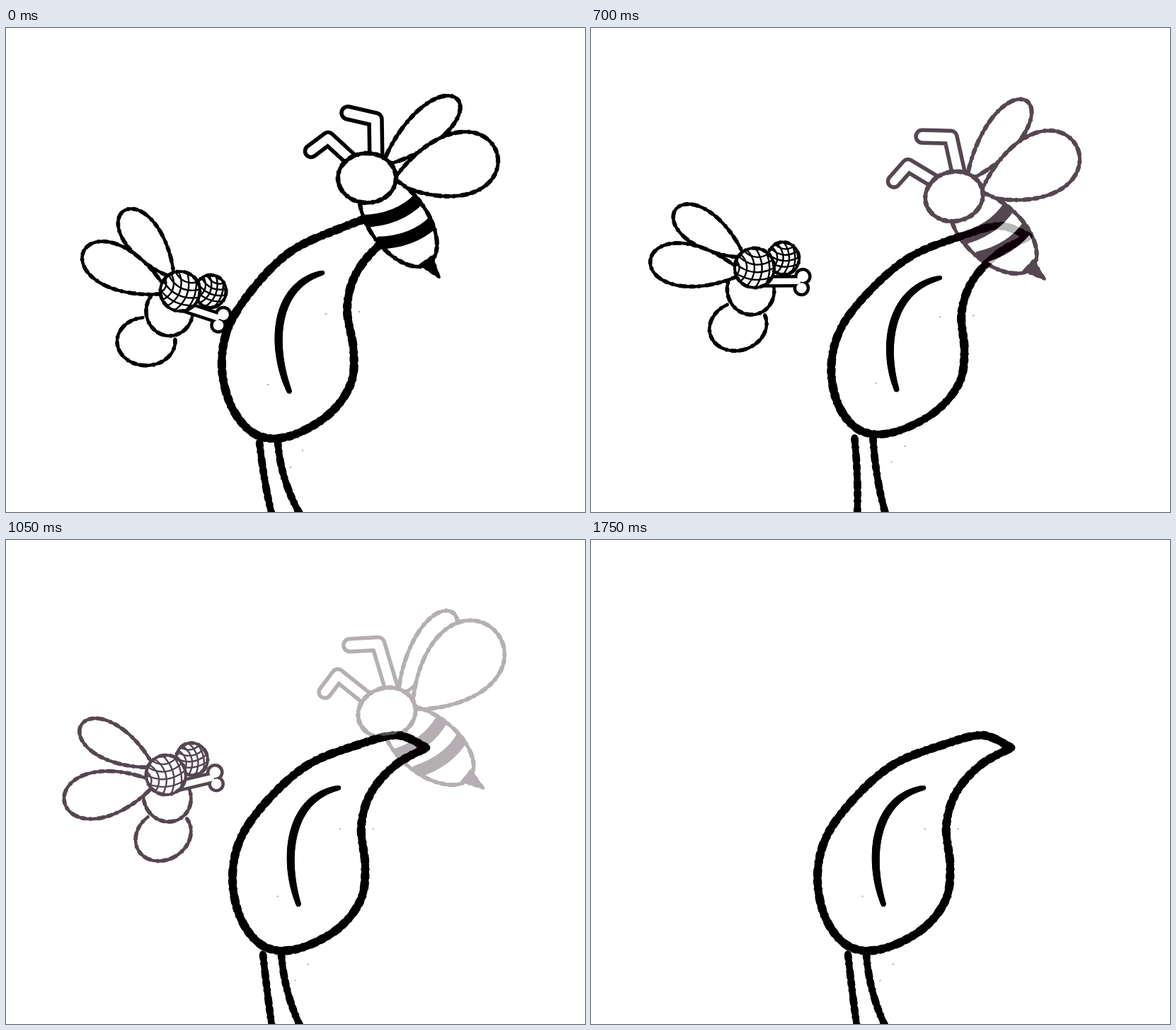
Animation of 818x684 px, one loop 2100 ms. Source, as an HTML page with a canvas:

```html
<!DOCTYPE html>
<html lang="en">
<head>
<meta charset="utf-8">
<title>Leaf, bee and fly</title>
<style>
html, body { margin: 0; width: 100%; height: 100%; overflow: hidden; background: #fff; }
canvas { display: block; }
</style>
</head>
<body>
<canvas id="stage" width="818" height="684"></canvas>
<script>
const W = 818, H = 684, STEP = 350, STEPS = 6;
const stage = document.getElementById('stage').getContext('2d');
const sheet = document.createElement('canvas');
sheet.width = W;
sheet.height = H;
const layer = sheet.getContext('2d');

// Smooth closed curve through points
function loopThrough(pts) {
  const path = new Path2D(), n = pts.length;
  const at = i => pts[(i + n) % n];
  path.moveTo(...pts[0]);
  for (let i = 0; i < n; i++) {
    // The first point is a sharp corner
    const a = i ? at(i - 1) : at(0), b = at(i), c = at(i + 1), d = i < n - 1 ? at(i + 2) : c;
    path.bezierCurveTo(b[0] + (c[0] - a[0]) / 6, b[1] + (c[1] - a[1]) / 6,
      c[0] - (d[0] - b[0]) / 6, c[1] - (d[1] - b[1]) / 6, c[0], c[1]);
  }
  path.closePath();
  return path;
}

function oval(x, y, rx, ry, from = 0, to = 2 * Math.PI) {
  const path = new Path2D();
  path.ellipse(x, y, rx, ry, 0, from, to);
  return path;
}

function line(...pts) {
  const path = new Path2D();
  pts.forEach(p => path.lineTo(...p));
  return path;
}

function bend(from, via, to) {
  const path = new Path2D();
  path.moveTo(...from);
  path.quadraticCurveTo(...via, ...to);
  return path;
}

// Teardrop that widens from its base towards a round end
function petal(x, y, angle, length, width) {
  const path = new Path2D(), cos = Math.cos(angle), sin = Math.sin(angle);
  for (let i = 0; i <= 60; i++) {
    const t = i / 60 * Math.PI, s = Math.sin(t);
    const u = length * s * s, v = width / 1.6 * Math.sin(2 * t) * s ** .8;
    path.lineTo(x + u * cos - v * sin, y + u * sin + v * cos);
  }
  return path;
}

// Pen line with a slightly uneven edge
function ink(c, path, width, fill) {
  if (fill) {
    c.fillStyle = fill;
    c.fill(path);
  }
  c.lineJoin = c.lineCap = 'round';
  c.lineWidth = width;
  c.stroke(path);
  c.lineCap = 'butt';
  c.lineWidth = width + 1.2;
  c.setLineDash([7, 5, 3, 8, 11, 4]);
  c.stroke(path);
  c.setLineDash([]);
}

// Outline around the union of thick round lines
function tubes(c, parts, pen) {
  const color = c.strokeStyle;
  c.lineCap = c.lineJoin = 'round';
  for (const side of [1, -1]) {
    c.strokeStyle = side > 0 ? color : '#fff';
    parts.forEach(([path, width]) => {
      c.lineWidth = width + side * pen;
      c.stroke(path);
    });
  }
  c.strokeStyle = color;
}

const BASE = { x: 376, y: 580 };
const leafPoses = [
  { x: 0, y: 0, lean: 0, tilt: 0, squash: 0 },
  { x: 9, y: 0, lean: .06, tilt: .06, squash: 0 },
  { x: 26, y: -6, lean: .085, tilt: .02, squash: .05 }
];
const leafEdge = loopThrough([[567, 282], [525, 267], [470, 284], [405, 314], [355, 361], [315, 421],
  [305, 480], [320, 538], [354, 575], [400, 577], [455, 547], [487, 503], [491, 455],
  [482, 398], [493, 350], [525, 309]]);
const specks = [[451, 403], [498, 400], [369, 503], [401, 620], [418, 596]];

function drawVein(c) {
  const mix = (t, a, b, d, e) =>
    (1 - t) ** 3 * a + 3 * t * (1 - t) ** 2 * b + 3 * t * t * (1 - t) * d + t ** 3 * e;
  c.fillStyle = '#000';
  for (let t = 0; t <= 1; t += .01) {
    const r = 3.2 + 2.6 * Math.sqrt(Math.sin(Math.PI * t));
    c.fill(oval(mix(t, 447, 375, 375, 401), mix(t, 346, 365, 455, 515), r, r));
  }
}

function drawLeaf(c, pose) {
  c.strokeStyle = '#000';
  const root = BASE.x + pose.x * .55, top = BASE.y + 5 + pose.y;
  ink(c, bend([root - 18, top], [root - 12, 640], [376, 690]), 9.5);
  ink(c, bend([root + 8, top], [root + 12, 640], [417, 690]), 9.5);
  c.save();
  c.translate(BASE.x + pose.x, BASE.y + pose.y);
  c.transform(1, pose.tilt, -pose.lean, 1 - pose.squash, 0, 0);
  c.translate(-BASE.x, -BASE.y);
  ink(c, leafEdge, 11, '#fff');
  drawVein(c);
  c.fillStyle = '#aaa';
  specks.forEach(([x, y]) => c.fillRect(x, y, 2, 2));
  c.restore();
}

// The origin is the middle of the head
function drawBee(c, { flap, solid }) {
  const pen = 5;
  ink(c, petal(22, -18, -.72, 141, 50), pen, '#fff');
  ink(c, petal(37, 5, -.26 - .22 * flap, 152 + 8 * flap, 88 + 12 * flap), pen, '#fff');

  c.save();
  c.rotate(.942);
  const body = oval(75, 0, 74, 41);
  ink(c, body, pen, solid && '#fff');
  c.save();
  c.clip(body);
  for (const u of [45, 83]) {
    c.lineWidth = 18;
    c.stroke(bend([u, 42], [u + 29, 0], [u + 22, -42]));
  }
  c.restore();
  ink(c, line([144, -9], [173, 0], [144, 11], [144, -9]), 3, c.strokeStyle);
  c.restore();

  const lift = 14 * flap, shift = 3 * flap;
  tubes(c, [[line([13 + shift, -15], [12 + shift, -83 - lift], [-27 + shift, -92 - lift]), 18]], 5.5);
  tubes(c, [[line([-18, -22], [-55 + shift, -56 - lift], [-79 + shift, -38 - lift]), 17]], 5.5);
  ink(c, oval(0, 0, 41, 35), pen + .5, '#fff');
}

function drawEye(c, x, y, rx, ry) {
  const rim = oval(x, y, rx, ry);
  ink(c, rim, 4, '#fff');
  c.save();
  c.clip(rim);
  c.lineWidth = 2.4;
  for (let r = rx * .5; r < rx * 2.4; r += rx * .38) {
    c.stroke(oval(x - rx * 1.2, y - ry * .4, r, r));
    c.stroke(oval(x + rx * .6, y - ry * 1.3, r, r));
  }
  c.restore();
}

// The origin is the middle of the large eye
function drawFly(c, { flap }) {
  const pen = 4.5;
  ink(c, oval(-48, 71, 41, 34, -.1, 4.6), pen, '#fff');
  ink(c, oval(-15, 28, 33, 35, 0, 4), pen, '#fff');
  ink(c, petal(-9, -19, -2.22 + .15 * flap, 118, 50), pen, '#fff');
  ink(c, petal(-18, 2, -2.68 - .12 * flap, 132, 60 + 5 * flap), pen, '#fff');
  tubes(c, [
    [line([0, 20], [52, 37]), 13],
    [line([61, 33], [61.1, 33]), 20],
    [line([54, 48], [54.1, 48]), 19]
  ], 4.5);
  drawEye(c, 43, 0, 22, 23);
  drawEye(c, 0, 0, 28, 28);
}

const beePoses = [
  { x: 510, y: 212, turn: 0 },
  { x: 501, y: 226, turn: -.089 },
  { x: 513, y: 238, turn: -.202 },
  { x: 538, y: 244, turn: -.278 }
];
const flyPoses = [
  { x: 246, y: 372, turn: 0 },
  { x: 239, y: 354, turn: -.15 },
  { x: 231, y: 339, turn: -.32 },
  { x: 226, y: 332, turn: -.55 }
];
const fades = [1, 1, .72, .31];

function drawInsect(draw, pose, flap, alpha) {
  layer.clearRect(0, 0, W, H);
  layer.strokeStyle = alpha < 1 ? '#14000e' : '#000';
  layer.save();
  layer.translate(pose.x, pose.y);
  layer.rotate(pose.turn);
  draw(layer, { flap, solid: alpha > .5 });
  layer.restore();
  stage.globalAlpha = alpha;
  stage.drawImage(sheet, 0, 0);
  stage.globalAlpha = 1;
}

// Counts up to last and back down again
const swing = (i, last) => last - Math.abs(last - i % (2 * last));

let shown = -1;
function tick(now) {
  const i = Math.floor(now / STEP) % STEPS;
  if (i !== shown) {
    shown = i;
    stage.fillStyle = '#fff';
    stage.fillRect(0, 0, W, H);
    drawLeaf(stage, leafPoses[swing(i, 2)]);
    // The fly fades one step after the bee
    if (i < 4) drawInsect(drawBee, beePoses[i], i % 2, fades[i]);
    if (i < 5) drawInsect(drawFly, flyPoses[swing(i, 3)], i % 2, fades[Math.max(0, i - 1)]);
  }
  requestAnimationFrame(tick);
}
requestAnimationFrame(tick);
</script>
</body>
</html>
```
